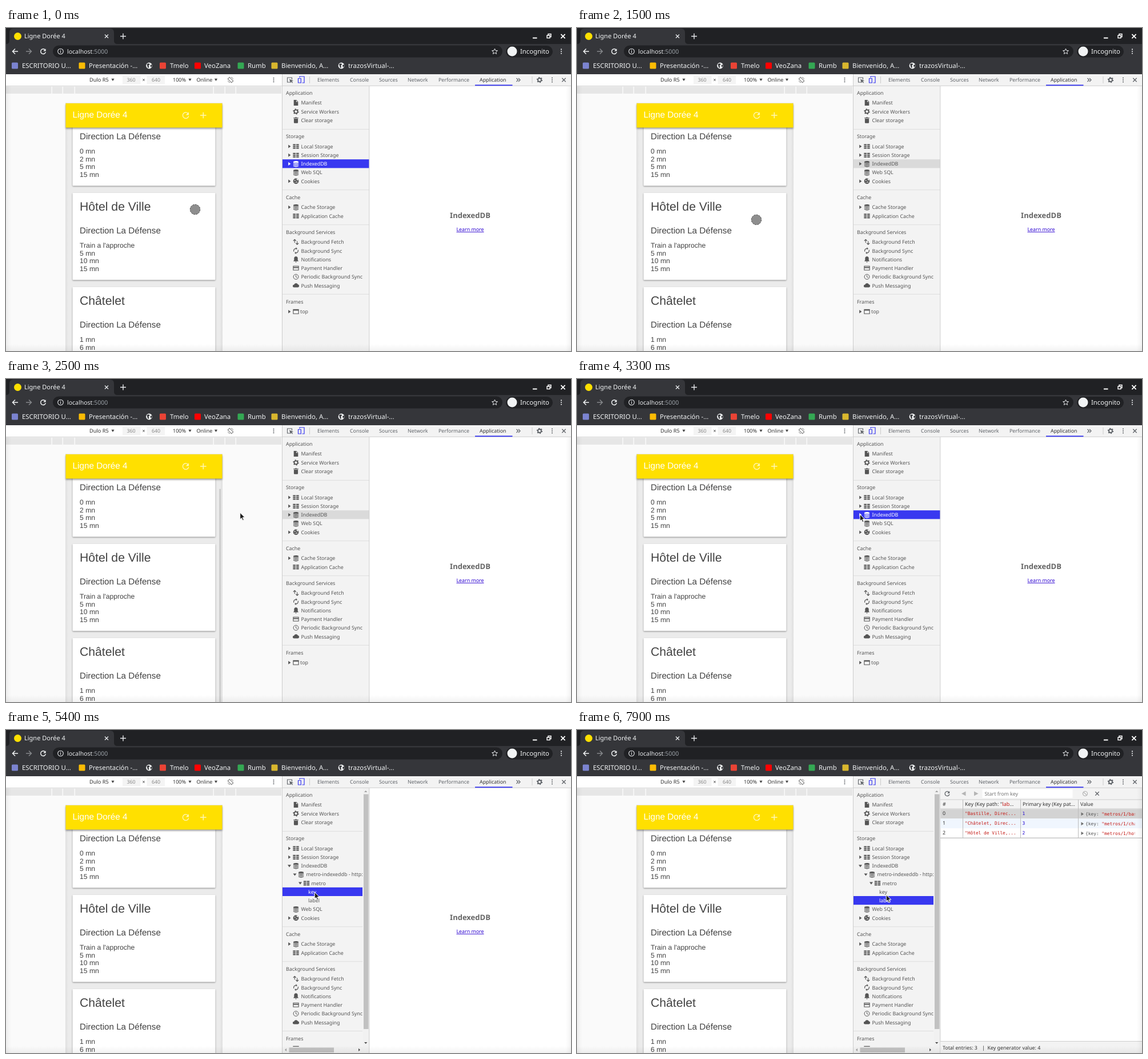
An HTML page for the animation above (8000 ms loop, 989x566 px).

```html
<!DOCTYPE html>
<html lang="en">
<head>
<meta charset="utf-8">
<title>Storage inspector</title>
<style>
  html, body { margin: 0; width: 100%; height: 100%; overflow: hidden; background: #fff; }
  svg { display: block; width: 989px; height: 566px; }
  text { font-family: "Noto Sans", "Open Sans", sans-serif; font-size: 8.85px; white-space: pre; text-rendering: geometricPrecision; }
  .app text { font-family: "Liberation Sans", Arial, sans-serif; }
  text.mono { font-family: "DejaVu Sans Mono", monospace; font-size: 7.85px; }
  .card { filter: drop-shadow(0 1px .8px rgba(0,0,0,.42)); }
  .bar { filter: drop-shadow(0 2px 1.4px rgba(0,0,0,.4)); }
</style>
</head>
<body>
<svg id="stage" viewBox="0 0 989 566" xmlns="http://www.w3.org/2000/svg"></svg>
<script>
const GREY = '#555', RED = '#c41a16', BLUE = '#3838f0', LINE = '#cdcdcd';

const rect = (x, y, w, h, fill, extra = '') =>
  `<rect x="${x}" y="${y}" width="${w}" height="${h}" fill="${fill}" ${extra}/>`;
const text = (x, y, s, fill = GREY, size = 0, extra = '') =>
  `<text x="${x}" y="${y}" fill="${fill}" ${size ? `style="font-size:${size}px"` : ''} ${extra}>${s}</text>`;
const mono = (x, y, s, fill = RED) => text(x, y, s, fill, 0, 'class="mono"');
const fillPath = (d, fill, extra = '') => `<path d="${d}" fill="${fill}" ${extra}/>`;
const stroke = (d, color, width = 1, extra = '') =>
  `<path d="${d}" fill="none" stroke="${color}" stroke-width="${width}" ${extra}/>`;
const circle = (x, y, r, fill, extra = '') => `<circle cx="${x}" cy="${y}" r="${r}" fill="${fill}" ${extra}/>`;
const place = (x, y, content, extra = '') => `<g transform="translate(${x} ${y})" ${extra}>${content}</g>`;
const dots = (x, y, color, gap = 3.6) => [-gap, 0, gap].map(d => circle(x, y + d, 1.05, color)).join('');
const cross = (x, y, r, color, width = 1.3) =>
  stroke(`M${x - r} ${y - r}l${2 * r} ${2 * r}m0 ${-2 * r}l${-2 * r} ${2 * r}`, color, width);
const reload = (x, y, r, color, width) => place(x, y,
  stroke(`M${r * .72} ${-r * .7}A${r} ${r} 0 1 0 ${r} ${r * .25}`, color, width) +
  fillPath(`M${r * 1.05} ${-r * 1.1}v${r}h${-r}z`, color));
const hline = (x1, x2, y, color = LINE) => stroke(`M${x1} ${y}H${x2}`, color);

const CC = 'currentColor';
const gear = circle(0, 0, 3, 'none', `stroke="${CC}" stroke-width="1.8"`) +
  circle(0, 0, 4.4, 'none', `stroke="${CC}" stroke-width="1.6" stroke-dasharray="1.9 2.7"`);
const icons = {
  file: fillPath('M-3.8-5h4.6l3 3v7h-7.6zM.4-4.2v2.8h2.8z', CC, 'fill-rule="evenodd"'),
  gear,
  trash: fillPath('M-4.2-4.6h2.4l.8-.8h2l.8.8h2.4v1.3h-8.4zM-3.6-2.6h7.2v6.4q0 1.3-1.3 1.3h-4.6q-1.3 0-1.3-1.3z', CC),
  grid: [-4, -1, 2].map(y => rect(-5.2, y, 4.7, 2.1, CC) + rect(.5, y, 4.7, 2.1, CC)).join(''),
  db: `<ellipse cy="-3.4" rx="4.6" ry="1.7" fill="${CC}"/>` +
    [-2.3, .2, 2.7].map(y => fillPath(`M-4.6 ${y}q4.6 2.8 9.2 0v1.4q-4.6 2.8-9.2 0z`, CC)).join(''),
  cookie: circle(0, 0, 4.8, CC) + circle(-1.8, -1.4, .9, '#f3f3f3') + circle(1.4, 1.6, 1, '#f3f3f3') +
    circle(-1.4, 2, .7, '#f3f3f3') + circle(2.4, -2.6, 1.3, '#f3f3f3'),
  updown: stroke('M-2.2 1.5V-4.4M2.2-1.5V4.4M-4.6-2l2.4-2.4L.2-2M-.2 2l2.4 2.4L4.6 2', CC, 1.1),
  sync: stroke('M-3.6 1.5A3.9 3.9 0 0 1 .5-3.8M3.6-1.5A3.9 3.9 0 0 1-.5 3.8', CC, 1.2) +
    fillPath('M0-6v4.4l2.4-2.2zM0 6V1.6l-2.4 2.2z', CC),
  bell: fillPath('M-4.2 3.2v-.8l1-1v-3q0-3 2.5-3.4a.75.75 0 0 1 1.4 0q2.5.4 2.5 3.4v3l1 1v.8zM-1.2 3.9h2.4a1.2 1.2 0 0 1-2.4 0z', CC),
  card: stroke('M-4.6-3.5h9.2v7h-9.2z', CC, 1.1) + rect(-4.6, -2, 9.2, 1.8, CC),
  clock: circle(0, 0, 4.4, 'none', `stroke="${CC}"`) + stroke('M0-2.8V.2l2.2 1.2', CC),
  cloud: fillPath('M-3.2 3.3a2.4 2.4 0 0 1-.1-4.8 3.6 3.6 0 0 1 6.6-.5 2.7 2.7 0 0 1 .2 5.3z', CC),
  frame: stroke('M-4.6-3.8h9.2v7.6h-9.2z', CC, 1.1) + rect(-4.6, -3.8, 9.2, 2, CC),
};

const arrow = (x, y, open, id = '') =>
  place(x, y, fillPath('M-1.8-3L2.4 0-1.8 3z', CC, `${id && `id="${id}"`} ${open ? 'transform="rotate(90)"' : ''}`));
const row = (y, icon, label, { x = 507.5, arrowAt = 0, open = false, id = '', tx = x + 9 } = {}) =>
  `<g ${id && `id="${id}"`} color="${GREY}">` +
  (arrowAt ? arrow(arrowAt, y, open, id && `${id}Arrow`) : '') +
  (icon ? place(x, y, icons[icon]) : '') + text(tx, y + 3.2, label, CC) + '</g>';
const section = (y, title) => text(490, y + 3.2, title);
const divider = y => hline(484, 636, y, '#dedede');

function browserChrome() {
  const light = '#e8eaed', ink = '#f1f3f4';
  const globe = x => circle(x, 66, 5.4, ink) + fillPath(`M${x - 4} 63l4-1 1 2-2 2 1 3-2 1-1-3zM${x + 2} 65l3-1v3l-2 2z`, '#35363a');
  const square = (x, color) => rect(x - 5.5, 60.5, 11, 11, color, 'rx="1.5"');
  const marks = [[28, 'ESCRITORIO U...'], [145, 'Presentación -...'], [287, 'Tmelo'], [347, 'VeoZana'],
    [423, 'Rumb'], [482, 'Bienvenido, A...'], [599, 'trazosVirtual-...']];
  return rect(0, 0, 989, 81, '#202124') + rect(0, 28, 989, 53, '#35363a') +
    fillPath('M0 28q6 0 6-6V8q0-7 7-7h169q7 0 7 7v14q0 6 6 6z', '#35363a') +
    circle(20.5, 14.5, 6.5, '#ffe000') + text(32, 18.3, 'Ligne Dorée 4', ink, 11) +
    cross(176, 14.5, 3, light) + stroke('M200 14.5h10m-5-5v10', light, 1.4) +
    stroke('M922 17.5h7.5', '#fff', 2) + stroke('M947 13h5v4.5h-5zM949 12.5v-2h5v5h-2', '#fff', 1.4) + cross(975, 14.5, 3.6, '#fff', 1.8) +
    stroke('M21 41H11.5m4.5-4.5L11.5 41l4.5 4.5', ink, 1.5) +
    stroke('M35 41h9.5m-4.5-4.5l4.5 4.5-4.5 4.5', '#85878a', 1.5) + reload(65, 41, 4.4, ink, 1.5) +
    rect(82, 30.5, 787, 21, '#202124', 'rx="10.5"') +
    circle(95.5, 41, 4.8, 'none', `stroke="${light}" stroke-width="1.1"`) + stroke('M95.5 40.3v3.2M95.5 38v1.2', light, 1.2) +
    text(107, 44.8, 'localhost<tspan fill="#9aa0a6">:5000</tspan>', light, 10.5) +
    place(855.5, 41, stroke('M0-4.8l1.4 3.2 3.5.3-2.7 2.3.8 3.4-3-1.8-3 1.8.8-3.4-2.7-2.3 3.5-.3z', light, 1)) +
    rect(875, 31, 82, 20.5, '#202124', 'rx="10.2"') + circle(886, 41, 8.5, '#f1f3f4') +
    text(900, 45, 'Incognito', ink, 11.3) + dots(972, 41, light) +
    square(15.5, '#7b83cf') + square(133, '#fbbc04') + globe(250.5) + square(274.5, '#ea4335') +
    square(335.5, '#f00') + square(411, '#34a853') + square(470, '#d9b72e') + globe(587) +
    marks.map(([x, s]) => text(x, 70, s, ink, 11.4)).join('');
}

function deviceToolbar() {
  const down = x => fillPath(`M${x - 2.6} 88.7h5.2L${x} 93z`, '#444');
  return rect(0, 81, 483, 20, '#fff') + rect(0, 101, 483, 465, '#fafafa') + hline(0, 483, 101.5, '#d6d6d6') +
    rect(0, 102.5, 482, 12.5, '#e6e6e6') +
    [80, 99, 120, 363, 383, 402].map(x => rect(x - .4, 102.5, 1.2, 12.5, '#fff')).join('') +
    text(146, 94.3, 'Dulo R5', '#333', 9.2) + down(187) +
    rect(204, 83.5, 74, 15, '#f4f4f4') + rect(235.5, 83.5, 11, 15, '#fff') +
    text(211.5, 94.3, '360', '#8a8a8a') + text(238.5, 94.3, '×', '#333') + text(255, 94.3, '640', '#8a8a8a') +
    text(292, 94.3, '100%', '#333', 9) + down(322) + text(333.5, 94.3, 'Online', '#333', 9) + down(367.5) +
    place(393, 91, stroke('M-2.2-4.5h4.4v9h-4.4z', '#777', 1, 'transform="rotate(-45)"') +
      stroke('M-4.6 1.5A4.8 4.8 0 0 0-1 4.7M4.6-1.5A4.8 4.8 0 0 0 1-4.7', '#777', .9)) +
    dots(468.5, 91, '#5f6368', 3.3);
}

function card(i, name, times) {
  const y = 124 + i * 165;
  return rect(116.5, y, 250, 152.5, '#fff', 'class="card" rx="1"') + text(129, y + 31, name, '#424242', 21.2) +
    text(129, y + 70.5, 'Direction La Défense', '#424242', 15.2) +
    times.map((s, k) => text(129, y + 96 + k * 13.7, s, '#424242', 12.15)).join('');
}

function phone() {
  return '<g class="app">' + rect(104, 131, 275, 435, '#ebebeb') +
    rect(104, 131, 5, 435, 'url(#edgeL)') + rect(374, 131, 5, 435, 'url(#edgeR)') +
    '<g clip-path="url(#phoneClip)"><g id="cards">' +
    card(0, 'Bastille', ['0 mn', '2 mn', '5 mn', '15 mn']) +
    card(1, 'Hôtel de Ville', ["Train a l'approche", '5 mn', '10 mn', '15 mn']) +
    card(2, 'Châtelet', ['1 mn', '6 mn', '9 mn', '14 mn']) + '</g>' +
    rect(373.3, 180, 2.7, 400, '#8e8e8e', 'id="thumb" rx="1"') + '</g>' +
    rect(104.5, 132, 274, 42.5, '#ffe000', 'class="bar"') + text(116.5, 157.2, 'Ligne Dorée 4', '#fff', 15.3) +
    reload(314.5, 153, 5.2, '#fff7b8', 1.4) + stroke('M340 153h10.6m-5.3-5.3v10.6', '#fff7b8', 1.5) + '</g>';
}

function inspectorTabs() {
  const tabs = [[545, 'Elements'], [602, 'Console'], [653, 'Sources'], [703, 'Network'], [757, 'Performance'], [829, 'Application']];
  return rect(484, 81, 505, 20, '#f3f3f3') + hline(484, 989, 101.3) +
    stroke('M498 95h-5.5v-8h8v3.5', '#5f6368', 1.1) + fillPath('M496 89.5l7 3-2.8.9 2 2.4-1 .8-2-2.4-1.2 2z', '#5f6368') +
    stroke('M514 87v-2h8v11h-3.5', BLUE, 1.2) + stroke('M511.5 88.5h4.8v7.5h-4.8z', BLUE, 1.2) +
    stroke('M531.5 85v12M921 85v12', '#ccc') +
    tabs.map(([x, s], i) => text(x, 94.2, s, i === 5 ? '#333' : '#5f6368')).join('') +
    rect(821, 99.4, 65.5, 1.8, BLUE) + stroke('M893.5 88l3 3-3 3m3.5-6l3 3-3 3', '#5f6368', 1.2) +
    place(934, 91, gear, 'color="#5f6368"') + dots(956, 91, '#5f6368', 3.5) + cross(976.5, 91, 3.2, '#5f6368', 1.3);
}

function sidebar() {
  const plain = list => list.map(([y, icon, label]) => row(y, icon, label)).join('');
  return rect(484, 102, 152, 464, '#f3f3f3') + '<g clip-path="url(#sideClip)">' +
    rect(484, 230.2, 152, 15.2, BLUE, 'id="highlight"') +
    section(114, 'Application') + plain([[131, 'file', 'Manifest'], [146.4, 'gear', 'Service Workers'], [161.6, 'trash', 'Clear storage']]) +
    divider(177.5) + section(190, 'Storage') +
    row(207.5, 'grid', 'Local Storage', { arrowAt: 496 }) + row(222.8, 'grid', 'Session Storage', { arrowAt: 496 }) +
    row(238, 'db', 'IndexedDB', { arrowAt: 496, id: 'database' }) +
    '<g id="children">' +
    row(253.2, 'db', 'metro-indexeddb - http://localhost:5000', { x: 516.5, arrowAt: 505.5, open: true }) +
    row(268.4, 'grid', 'metro', { x: 526, arrowAt: 515, open: true, tx: 534.5 }) +
    row(283.6, '', 'key', { tx: 529, id: 'key' }) + row(298.8, '', 'label', { tx: 529, id: 'label' }) + '</g>' +
    '<g id="below">' + row(253.2, 'db', 'Web SQL') + row(268.4, 'cookie', 'Cookies', { arrowAt: 496 }) +
    divider(283.7) + section(296.6, 'Cache') + row(314, 'db', 'Cache Storage', { arrowAt: 496 }) + row(329.4, 'grid', 'Application Cache') +
    divider(344.7) + section(357.6, 'Background Services') +
    plain([[375, 'updown', 'Background Fetch'], [390.3, 'sync', 'Background Sync'], [405.6, 'bell', 'Notifications'],
      [420.8, 'card', 'Payment Handler'], [436, 'clock', 'Periodic Background Sync'], [451.3, 'cloud', 'Push Messaging']]) +
    divider(466.5) + section(479.5, 'Frames') + row(497, 'frame', 'top', { arrowAt: 496, tx: 515 }) + '</g></g>' +
    '<g id="scrollbars">' + rect(625, 102, 11, 464, '#f1f1f1') + rect(484, 555, 152, 11, '#f1f1f1') +
    rect(626, 112.5, 8.5, 411.5, '#c1c1c1') + rect(495.5, 556.5, 78.5, 8.5, '#c1c1c1') +
    fillPath('M627 109h5.4l-2.7-3zM491 557.7v5.4l-3-2.7z', '#a3a3a3') +
    fillPath('M627 547h5.4l-2.7 3zM617 557.7v5.4l3-2.7z', '#505050') + '</g>' +
    stroke('M483.5 81V566M635.8 102V566', LINE);
}

function dataPanel() {
  const ink = '#333', rowY = i => 149.3 + i * 16.9;
  const values = list => list.map((s, i) => mono(679, rowY(i), `"${s}...`)).join('');
  return '<g id="empty">' + text(812.5, 333.2, 'IndexedDB', '#666', 13, 'text-anchor="middle" font-weight="700"') +
    text(812.5, 356.2, 'Learn more', '#2a00d0', 8.85, 'text-anchor="middle" text-decoration="underline"') + '</g>' +
    '<g id="table">' + rect(636.3, 102, 353, 36, '#f3f3f3') + hline(636, 989, 122) + hline(636, 989, 138) +
    reload(648, 111.5, 4, '#5f6368', 1.3) + fillPath('M680.5 107.5v8l-7.5-4zM695 107.5v8l7.5-4z', '#b5b5b5') +
    rect(709.5, 104, 158, 15, '#fff') + text(713.5, 114.8, 'Start from key', '#757575') +
    circle(889.5, 111.5, 4, 'none', 'stroke="#b0b0b0" stroke-width="1.2"') + stroke('M886.7 108.7l5.6 5.6', '#b0b0b0', 1.2) +
    cross(910.5, 111.5, 3.2, '#5f6368') + rect(636.3, 138.5, 353, 16.7, '#d3d3d3') + rect(636.3, 155.2, 353, 17, '#f0f6fe') +
    hline(636, 989, 189.2, '#aaa') + stroke('M675.5 122V189M776.5 122V189M877.5 122V189', '#bdbdbd') +
    text(640, 133.2, '#', ink) + text(780, 133.2, 'Primary key (Key pat...', ink) + text(881, 133.2, 'Value', ink) +
    '<g clip-path="url(#valueClip)">' + ['bastille', 'chatelet', 'hotel'].map((name, i) =>
      text(640, rowY(i), i, ink) + mono(779.5, rowY(i), [1, 3, 2][i], '#1c00cf') +
      place(884.5, rowY(i) - 2, fillPath('M-2-3L2.5 0-2 3z', '#6e6e6e')) +
      mono(890, rowY(i) + .6, `{key: <tspan fill="${RED}">"metros/1/${name}"</tspan>`, '#555')).join('') + '</g>' +
    '<g id="byKey">' + text(679, 133.2, `Key (Key path: "<tspan fill="${RED}">key</tspan>")`, ink, 9) +
    values(['metros/1/bastil', 'metros/1/chatel', 'metros/1/hotel+']) + '</g>' +
    '<g id="byLabel">' + text(679, 133.2, `Key (Key path: "<tspan fill="${RED}">lab</tspan>...`, ink, 9) +
    values(['Bastille, Direc', 'Châtelet, Direc', 'Hôtel de Ville,']) + '</g>' +
    rect(636.3, 545.5, 353, 21, '#f3f3f3') + hline(636, 989, 545.5) +
    text(640, 559.7, 'Total entries: 3', ink) + text(709, 559.7, '|', ink) + text(718.5, 559.7, 'Key generator value: 4', ink) + '</g>';
}

const gradient = (id, from, to, vertical = 0) => `<linearGradient id="${id}" x2="${1 - vertical}" y2="${vertical}">
  <stop stop-color="#000" stop-opacity="${from}"/><stop offset="1" stop-color="#000" stop-opacity="${to}"/></linearGradient>`;
const clip = (id, x, y, w, h) => `<clipPath id="${id}">${rect(x, y, w, h, '#000', `id="${id}Box"`)}</clipPath>`;

document.getElementById('stage').innerHTML =
  '<defs>' + clip('phoneClip', 104, 174, 275, 392) + clip('sideClip', 484, 102, 152, 464) + clip('valueClip', 636, 138, 340.5, 52) +
  gradient('edgeL', .05, 0) + gradient('edgeR', 0, .05) + gradient('edgeB', 0, .05, 1) + '</defs>' +
  rect(0, 0, 989, 566, '#fff') + browserChrome() + deviceToolbar() + phone() +
  inspectorTabs() + sidebar() + dataPanel() +
  rect(0, 102, 9, 464, 'url(#edgeL)') + rect(980, 102, 9, 464, 'url(#edgeR)') + rect(0, 554, 989, 12, 'url(#edgeB)') +
  `<g id="touch">${circle(0, 0, 8.7, '#888', 'fill-opacity=".95" stroke="#4a4a4a" stroke-width="1" stroke-dasharray="3 1.5"')}</g>` +
  `<g id="pointer">${fillPath('M.2 1.2V13L2.9 10.5 4.9 14.9 6.9 14 4.9 9.7H8.7z', '#1c1c1c', 'stroke="#fff"')}</g>`;

const el = id => document.getElementById(id);
const show = (id, on) => el(id).setAttribute('display', on ? 'inline' : 'none');
const move = (id, x, y) => el(id).setAttribute('transform', `translate(${x} ${y})`);

// Each key is [time, ...values], joined linearly.
function sample(keys, t) {
  const next = keys.findIndex(k => k[0] > t);
  if (next === 0) return keys[0].slice(1);
  if (next < 0) return keys[keys.length - 1].slice(1);
  const a = keys[next - 1], b = keys[next], f = (t - a[0]) / (b[0] - a[0]);
  return a.slice(1).map((v, i) => v + (b[i + 1] - v) * f);
}

const cursorKeys = [[0, 331, 318], [500, 320, 217], [900, 317, 262], [1200, 315, 332], [1300, 315, 332],
  [1500, 314, 336], [1900, 323, 344], [2200, 318, 332], [2600, 440, 200], [2800, 548, 225], [3100, 495, 236],
  [3600, 495, 236], [4000, 511, 258], [4200, 511, 258], [4700, 517, 268], [4900, 517, 268], [5300, 540, 283],
  [5900, 540, 283], [6200, 540.5, 288], [6400, 540.5, 288], [6700, 543, 297], [7700, 543, 297], [7900, 541, 287.5]];
const scrollKeys = [[1500, 0], [1800, 13], [1900, 14.5], [2200, 0]];
const thumbKeys = [[1500, 0], [1600, 1], [2300, 1], [2600, 0]];

function draw(t) {
  const [x, y] = sample(cursorKeys, t), [scroll] = sample(scrollKeys, t);
  const overPhone = x < 379;
  show('touch', overPhone);
  show('pointer', !overPhone);
  move(overPhone ? 'touch' : 'pointer', x, y);

  move('cards', 0, scroll);
  el('thumb').setAttribute('y', 180 + (14.5 - scroll) * .87);
  el('thumb').setAttribute('opacity', sample(thumbKeys, t)[0]);

  const open = t >= 3400, focused = t < 500 || t >= 3200;
  const selected = t < 5300 ? 'database' : t < 6700 ? 'key' : 'label';
  const top = { database: 230.2, key: 275.8, label: 291 };
  el('highlight').setAttribute('y', top[selected]);
  el('highlight').setAttribute('fill', focused ? BLUE : '#dadada');
  for (const id in top) el(id).setAttribute('color', id === selected && focused ? '#fff' : GREY);
  el('databaseArrow').setAttribute('transform', `rotate(${open ? 90 : 0})`);
  el('sideClipBox').setAttribute('width', open ? 140 : 152);
  el('sideClipBox').setAttribute('height', open ? 453 : 464);
  move('below', 0, open ? 61 : 0);
  show('children', open);
  show('scrollbars', open);

  show('empty', t < 5500);
  show('table', t >= 5500);
  show('byKey', t < 6800);
  show('byLabel', t >= 6800);
}

function tick() {
  draw(Math.floor(performance.now() % 8000 / 100) * 100);
  requestAnimationFrame(tick);
}
tick();
</script>
</body>
</html>
```
